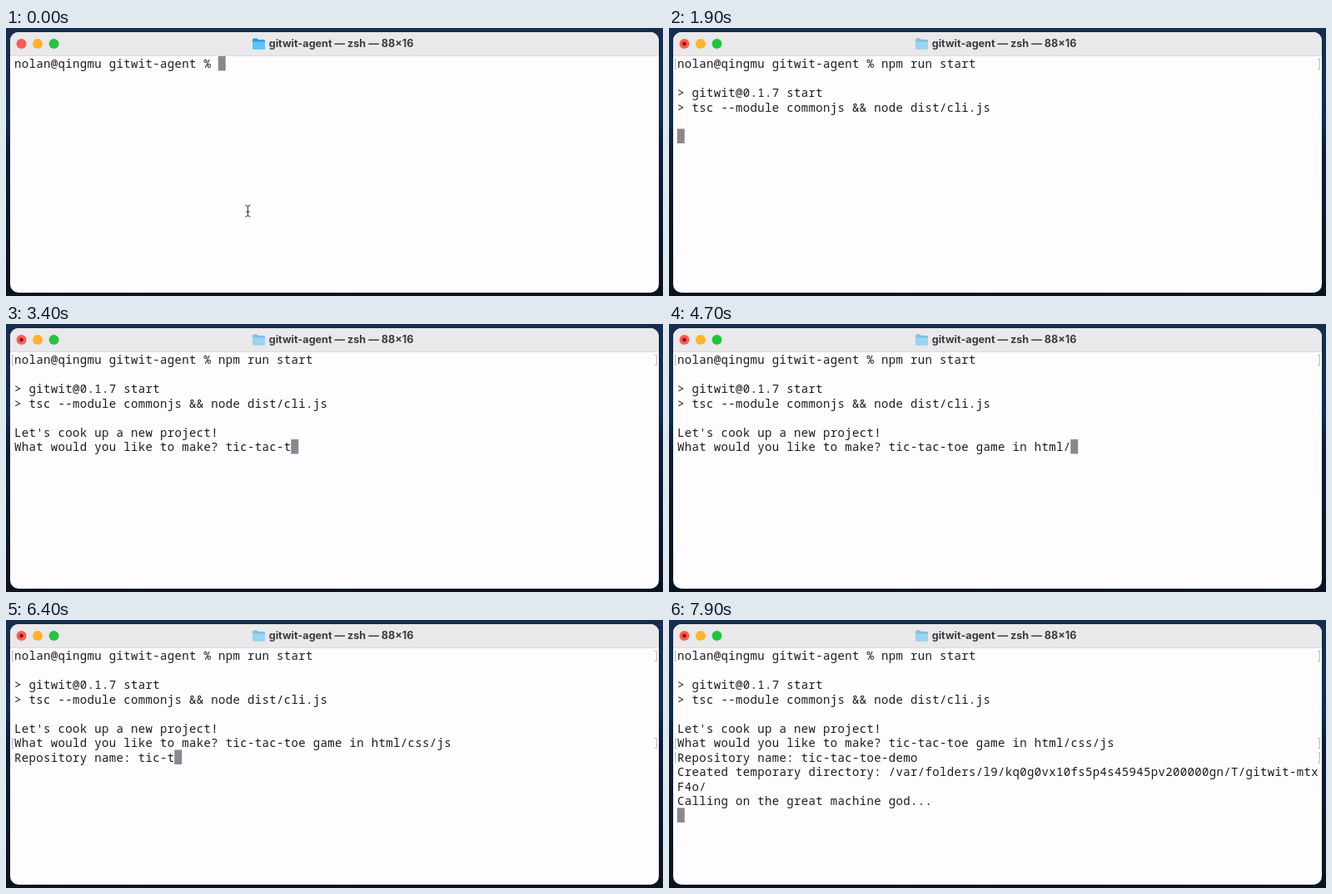
Recreate the animation shown at these times as an HTML page. Size 789 by 323 pixels, loop 8 s.

```html
<!DOCTYPE html>
<html lang="en">
<head>
<meta charset="utf-8">
<title>Terminal</title>
<style>
html, body { margin: 0; width: 100%; height: 100%; overflow: hidden; background: #0b1626; }
svg { position: absolute; left: 0; top: 0; display: block; }
pre {
  position: absolute; left: 10px; top: 34px; margin: 0;
  font: 14px/17.5px "Noto Sans Mono", "DejaVu Sans Mono", monospace;
  letter-spacing: .35px; color: #1c1b1e; font-variant-ligatures: none;
}
.title { font: 700 12.6px Inter, "Open Sans", sans-serif; fill: #3c3b3e; }
</style>
</head>
<body>
<svg width="789" height="323" viewBox="0 0 789 323">
  <defs>
    <linearGradient id="sky" x2="0" y2="1">
      <stop offset="0" stop-color="#172d4d"/>
      <stop offset=".35" stop-color="#0e2d50"/>
      <stop offset=".45" stop-color="#0b1d38"/>
      <stop offset="1" stop-color="#0a131f"/>
    </linearGradient>
  </defs>
  <rect width="789" height="323" fill="url(#sky)"/>
  <rect x="5" y="5" width="779" height="314" rx="10" fill="#fefcff"/>
  <path d="M5 33.500V15a10 10 0 0 1 10-10H774a10 10 0 0 1 10 10V33.500Z" fill="#e9e8ea"/>
  <path d="M5 33.500H784" stroke="#dcdadd"/>
  <circle cx="18.500" cy="19" r="6" fill="#fe5b53"/>
  <circle cx="38" cy="19" r="6" fill="#fdb32b"/>
  <circle cx="57.500" cy="19" r="6" fill="#29c23f"/>
  <circle id="busy" cx="18.500" cy="19" r="2.200" fill="#7c110e"/>
  <g id="folder">
    <path d="M296 14q0-1.500 1.500-1.500h4l1.500 1.500h6.500q1.500 0 1.500 1.500v8.500q0 1.500-1.500 1.500h-12q-1.500 0-1.500-1.500z" fill="#2b9fdc"/>
    <path d="M296 16.500h15v7.500q0 1.500-1.500 1.500h-12q-1.500 0-1.500-1.500z" fill="#5cc3f5"/>
  </g>
  <text class="title" x="402.500" y="23" text-anchor="middle">gitwit-agent — zsh — 88×16</text>
  <path id="marks" fill="none" stroke="#b9b7bc"/>
  <rect id="cursor" width="9" height="17.500" fill="#8a888c"/>
  <path id="beam" d="M287.500 213.500q3 0 3 2.500v9q0 2.500-3 2.500M293.500 213.500q-3 0-3 2.500v9q0 2.500 3 2.500M288.500 221.500h4" fill="none" stroke="#333"/>
</svg>
<pre id="screen"></pre>
<script>
const COL = 8.75, ROW = 17.5, LOOP = 8000, STEP = 100;
const $ = id => document.getElementById(id);

// Text typed so far; keys are [time, characters] points joined by straight lines.
function typed(text, t, keys) {
  let [t0, n0] = keys[0];
  if (t < t0) return "";
  for (const [t1, n1] of keys) {
    if (t < t1) return text.slice(0, Math.round(n0 + (n1 - n0) * (t - t0) / (t1 - t0)));
    [t0, n0] = [t1, n1];
  }
  return text.slice(0, n0);
}

function terminal(t) {
  const rows = ["nolan@qingmu gitwit-agent % " + typed("npm run start", t, [[0, 0], [800, 12], [900, 13]])];
  const marks = [];
  if (t >= 1000) { marks.push(0); rows.push(""); }
  if (t >= 1300) rows.push("> gitwit@0.1.7 start", "> tsc --module commonjs && node dist/cli.js", "", "");
  if (t >= 2400) {
    rows[5] = "Let's cook up a new project!";
    rows.push("What would you like to make? " + typed("tic-tac-toe game in html/css/js", t,
      [[2500, 0], [3400, 9], [4100, 17], [4200, 18], [4700, 25], [4800, 25], [5400, 31]]));
  }
  if (t >= 5500) {
    marks.push(6);
    rows.push("Repository name: " + typed("tic-tac-toe-demo", t,
      [[5800, 0], [6200, 4], [6300, 4], [7500, 16]]));
  }
  if (t >= 7700) { marks.push(7); rows.push(""); }
  if (t >= 7800) {
    rows[8] = "Created temporary directory: /var/folders/l9/kq0g0vx10fs5p4s45945pv200000gn/T/gitwit-mtx";
    rows.push("F4o/", "Calling on the great machine god...", "");
  }
  return { rows, marks };
}

function draw(now) {
  const t = Math.floor(now % LOOP / STEP) * STEP;
  const { rows, marks } = terminal(t);
  const last = rows.length - 1, running = t >= 1100;
  $("screen").textContent = rows.join("\n");
  $("cursor").setAttribute("x", 9.75 + rows[last].length * COL);
  $("cursor").setAttribute("y", 34 + last * ROW);
  $("marks").setAttribute("d", marks.map(r => {
    const y = 37.5 + r * ROW;
    return `M9 ${y}h-1.500v12h1.500M779 ${y}h2.500v12h-2.500`;
  }).join(""));
  $("busy").style.opacity = running ? 1 : 0;
  $("folder").style.opacity = running ? 0.55 : 1;
  $("beam").style.opacity = t < 100 ? 1 : 0;
}

const start = performance.now();
function frame() {
  draw(performance.now() - start);
  requestAnimationFrame(frame);
}
frame();
</script>
</body>
</html>
```
